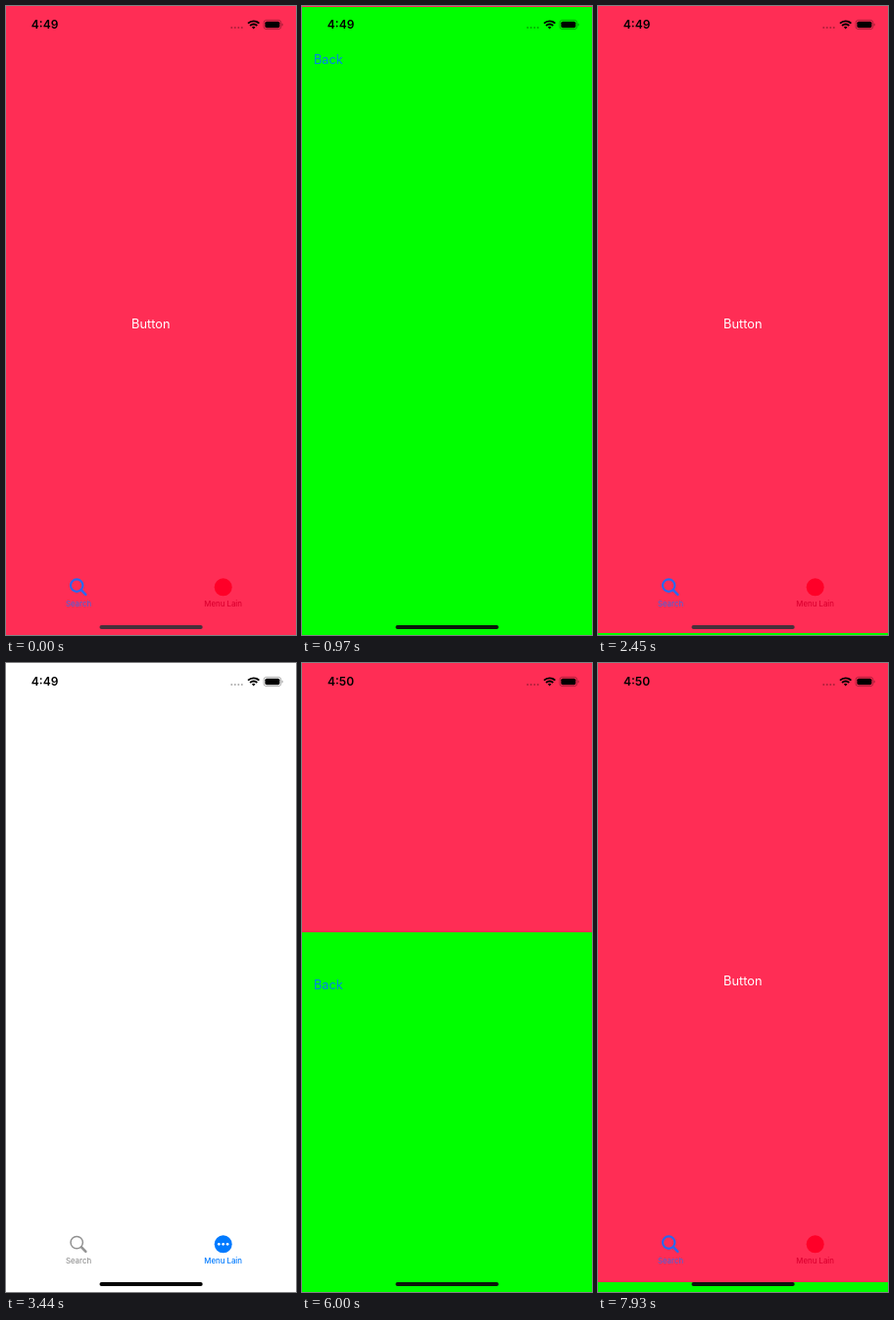
An HTML page that plays this animation: 296 by 640 pixels, repeating every 8000 ms.

```html
<!DOCTYPE html>
<html lang="en">
<head>
<meta charset="utf-8">
<title>Tabs and sheet</title>
<style>
  html, body { margin: 0; width: 100%; height: 100%; overflow: hidden; background: #fff; }
  svg { display: block; width: 100vw; height: 100vh; font-family: Inter, Roboto, sans-serif; }
  .label { font-size: 7.8px; font-weight: 500; text-anchor: middle; }
  .link { font-size: 12.8px; }
</style>
</head>
<body>
<svg viewBox="0 0 296 640">
  <rect id="page" width="296" height="640"/>
  <text id="button" class="link" x="147.8" y="328" text-anchor="middle" fill="#fff">Button</text>

  <g id="searchIcon" fill="none">
    <circle cx="72.2" cy="589.6" r="6.2"/>
    <path d="M77 594.4L81.4 598.9" stroke-width="2.5" stroke-linecap="round"/>
  </g>
  <text id="searchLabel" class="label" x="74" y="611">Search</text>
  <circle id="menuIcon" cx="221.7" cy="591.3" r="9"/>
  <g id="menuDots" fill="#fff">
    <circle cx="217.3" cy="591.3" r="1.35"/>
    <circle cx="221.7" cy="591.3" r="1.35"/>
    <circle cx="226.1" cy="591.3" r="1.35"/>
  </g>
  <text id="menuLabel" class="label" x="221.7" y="611">Menu Lain</text>

  <g id="sheet">
    <rect width="296" height="640" fill="#0f0"/>
    <text id="back" class="link" x="12" y="57.6" fill="#0080ec">Back</text>
  </g>

  <text id="clock" x="39.6" y="23.2" font-size="12" font-weight="600" text-anchor="middle"></text>
  <path d="M230.3 21.9h.01M233.8 21.9h.01M237.3 21.9h.01M240.8 21.9h.01"
        stroke="#000" stroke-opacity=".32" stroke-width="2" stroke-linecap="round"/>
  <g fill="none" stroke="#000" stroke-width="1.8">
    <path d="M247 17.7A8.2 8.2 0 0 1 258.4 17.7"/>
    <path d="M249.1 20A5.1 5.1 0 0 1 256.3 20"/>
  </g>
  <path d="M252.7 23.4L250.9 21.5A2.6 2.6 0 0 1 254.5 21.5Z"/>
  <rect x="263" y="14.3" width="17.8" height="9.3" rx="2.8" fill="none" stroke="#000" stroke-opacity=".38" stroke-width=".8"/>
  <rect x="264.4" y="15.7" width="15" height="6.5" rx="1.6"/>
  <path d="M281.6 17.4a1.7 1.7 0 0 1 0 3.1z" fill-opacity=".42"/>
  <rect id="home" x="95.5" y="630" width="105.2" height="4" rx="2"/>
</svg>
<script>
const LOOP = 8000, HEIGHT = 640, STIFFNESS = 18.26;

// Moments at which the picture is refreshed; it holds still in between.
const ticks = [0, 500, 617, 735, 852, 970, 1770, 1970, 2090, 2210, 2330, 2450, 3250, 3440,
  4580, 4690, 4830, 6000, 6120, 6240, 6360, 7390, 7700, 7815, 7930];

const slides = [
  { start: 508, settled: 1770, from: HEIGHT, to: 0 },
  { start: 2012, settled: 3250, from: 0, to: HEIGHT },
  { start: 5895, settled: 7390, from: HEIGHT, to: 0 },
  { start: 7595, settled: LOOP, from: 0, to: HEIGHT }
];

const themes = {
  pink: { page: '#ff2d55', search: '#2a68ee', searchText: '#555fd0', menu: '#ff0028', menuText: '#dc0030', stroke: 2.2 },
  searchTab: { page: '#fff', search: '#007aff', searchText: '#007aff', menu: '#929292', menuText: '#929292', stroke: 1.5 },
  menuTab: { page: '#fff', search: '#929292', searchText: '#929292', menu: '#007aff', menuText: '#007aff', stroke: 1.5 }
};

const el = id => document.getElementById(id);
const set = (id, attrs) => {
  for (const name in attrs) el(id).setAttribute(name, attrs[name]);
};
const within = (t, a, b) => t >= a && t < b;

// Critically damped spring: share of the distance still to go.
function remaining(ms) {
  const x = STIFFNESS * ms / 1000;
  return (1 + x) * Math.exp(-x);
}

function sheetTop(t) {
  const slide = slides.filter(s => t >= s.start).pop();
  if (!slide) return HEIGHT;
  const left = t >= slide.settled ? 0 : remaining(t - slide.start);
  return Math.round(slide.to + (slide.from - slide.to) * left);
}

function themeAt(t) {
  if (within(t, 3440, 4690)) return themes.menuTab;
  return within(t, 4690, 4830) ? themes.searchTab : themes.pink;
}

function backOpacity(t) {
  if (within(t, 1770, 1970) || within(t, 7390, 7700)) return 0.2;
  return within(t, 1970, 2090) || within(t, 7700, 7815) ? 0.6 : 1;
}

function draw(time) {
  const t = ticks.filter(tick => tick <= time).pop();
  const theme = themeAt(t), pink = theme === themes.pink, top = sheetTop(t);
  set('page', { fill: theme.page });
  set('button', { visibility: pink ? 'visible' : 'hidden', opacity: within(t, 500, 617) ? 0.4 : 1 });
  set('searchIcon', { stroke: theme.search, 'stroke-width': theme.stroke });
  set('searchLabel', { fill: theme.searchText });
  set('menuIcon', { fill: theme.menu });
  set('menuDots', { visibility: pink ? 'hidden' : 'visible' });
  set('menuLabel', { fill: theme.menuText });
  set('sheet', { transform: `translate(0 ${top})` });
  set('back', { opacity: backOpacity(t) });
  set('home', { fill: !pink ? '#000' : top <= 632 ? '#0b160b' : '#47303a' });
  el('clock').textContent = t < 4580 ? '4:49' : '4:50';
}

const begin = performance.now();
function loop() {
  draw((performance.now() - begin) % LOOP);
  requestAnimationFrame(loop);
}
loop();
</script>
</body>
</html>
```
